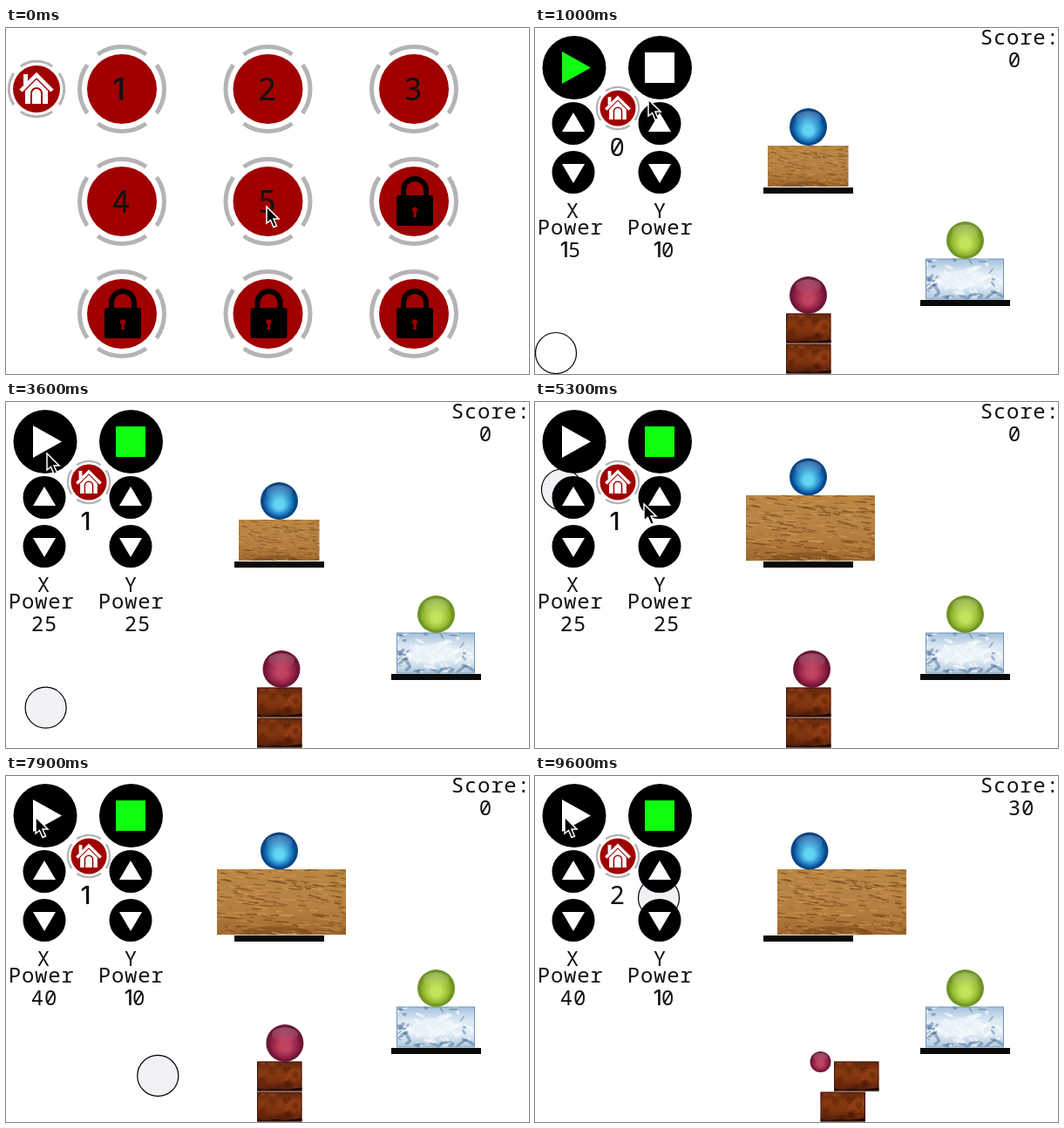
These frames come from a looping animation (600x397 px, 9700 ms). An HTML page with a canvas:

```html
<!DOCTYPE html>
<html lang="en">
<head>
<meta charset="utf-8">
<title>Ball launcher</title>
<style>
  html, body { margin: 0; width: 100%; height: 100%; overflow: hidden; background: #fff; }
  canvas { display: block; }
</style>
</head>
<body>
<canvas id="stage" width="600" height="397"></canvas>
<script>
const c = document.getElementById('stage').getContext('2d');
const LOOP = 9700, STEP = 100, GRAVITY = 4e-4;
const OPEN = 300, LAUNCH = 3550, GROW = 4050, RELAUNCH = 7950, CRASH = 8080, PUSH = 9250;
const RED = '#a00000', GREEN = '#10ff10';

// Keys are [time, value]; gravity bends each stretch into a parabola.
function track(t, keys, gravity = 0) {
  if (t <= keys[0][0]) return keys[0][1];
  for (let i = 1; i < keys.length; i++) {
    const [a, from] = keys[i - 1], [b, to] = keys[i];
    if (t <= b) return from + (to - from) * (t - a) / (b - a) - gravity / 2 * (t - a) * (b - t);
  }
  return keys[keys.length - 1][1];
}
const count = (t, times) => times.filter(time => t >= time).length;

const ballX = [[LAUNCH, 24], [GROW, 240], [5180, 24], [5300, 31], [6800, 114], [RELAUNCH, 177],
  [CRASH, 264], [8600, 24], [8800, 84], [PUSH, 218], [9600, 142]];
const ballY = [[LAUNCH, 373], [GROW, 195], [6110, 373], [7486, 373], [RELAUNCH, 345],
  [CRASH, 337], [8240, 373], [9600, 140]];
const cursorPath = [[0, 299, 205], [OPEN, 299, 205], [1000, 130, 82], [1200, 140, 108], [1900, 140, 108],
  [2200, 44, 108], [2800, 44, 108], [3300, 47, 59], [4200, 47, 59], [5300, 125, 117], [5700, 44, 108],
  [6400, 44, 108], [6800, 131, 157], [7400, 133, 157], [7700, 45, 20], [7900, 34, 47]];

function random(seed) {
  return () => (seed = (seed * 16807) % 2147483647) / 2147483647;
}
function disc(x, y, r, fill) {
  c.fillStyle = fill;
  c.beginPath();
  c.arc(x, y, r, 0, 7);
  c.fill();
}
function oval(x, y, rx, ry, turn, fill) {
  c.fillStyle = fill;
  c.beginPath();
  c.ellipse(x, y, rx, ry, turn, 0, 7);
  c.fill();
}
function rect(x, y, w, h, fill) {
  c.fillStyle = fill;
  c.fillRect(x, y, w, h);
}
function shape(points, fill) {
  c.fillStyle = fill;
  c.beginPath();
  points.forEach(([x, y]) => c.lineTo(x, y));
  c.closePath();
  c.fill();
}
function at(x, y, scale, draw) {
  c.save();
  c.translate(x, y);
  c.scale(scale, scale);
  draw();
  c.restore();
}
// Even letter cells, with a narrow cell for the plain one.
function write(text, x, y, size = 24) {
  c.fillStyle = '#111';
  for (const letter of String(text)) {
    const one = letter === '1';
    c.font = `500 ${size}px ${one ? 'Inter' : '"Noto Sans Mono"'}, monospace`;
    c.fillText(letter, x - size * .05, y);
    x += size * (one ? .38 : .63);
  }
}

function ring(r, width) {
  c.strokeStyle = '#b4b4b6';
  c.lineWidth = width;
  for (let i = 0; i < 4; i++) {
    const mid = i * Math.PI / 2;
    c.beginPath();
    c.arc(0, 0, r, mid - .61, mid + .61);
    c.stroke();
  }
}
function home(x, y, scale) {
  at(x, y, scale, () => {
    disc(0, 0, 33, '#fff');
    ring(31.7, 3);
    disc(0, 0, 27, RED);
    rect(-15, -17, 5, 12, '#fff');
    shape([[0, -12], [13, 1], [13, 17], [-13, 17], [-13, 1]], '#fff');
    c.lineJoin = 'miter';
    for (const [color, width, drop] of [[RED, 1.5, 4], ['#fff', 4.5, 0]]) {
      c.strokeStyle = color;
      c.lineWidth = width;
      c.beginPath();
      c.moveTo(-18, 2 + drop);
      c.lineTo(0, -16 + drop);
      c.lineTo(18, 2 + drop);
      c.stroke();
    }
    c.strokeStyle = RED;
    c.lineWidth = 2;
    c.beginPath();
    c.moveTo(-6, 17);
    c.arc(0, 5, 6, Math.PI, 0);
    c.lineTo(6, 17);
    c.stroke();
  });
}
function padlock() {
  c.strokeStyle = '#000';
  c.lineWidth = 6;
  c.beginPath();
  c.moveTo(-13, -5);
  c.arc(0, -13, 13, Math.PI, 0);
  c.lineTo(13, -5);
  c.stroke();
  c.fillStyle = '#000';
  c.beginPath();
  c.roundRect(-21, -7, 42, 35, 3);
  c.fill();
  disc(0, 9.5, 3, RED);
  shape([[-1, 10], [1, 10], [2, 18], [-2, 18]], RED);
}
function menu() {
  home(35, 70, 1);
  for (let i = 0; i < 9; i++) {
    at(133 + i % 3 * 167.5, 70 + Math.floor(i / 3) * 129, 1, () => {
      ring(48.5, 5);
      disc(0, 0, 40, RED);
      if (i < 5) write(i + 1, i ? -10 : -9, 13, 36);
      else at(1, 0, 1, padlock);
    });
  }
}

function marble(x, y, r, rim, body, glow) {
  const fill = c.createRadialGradient(x, y + r * .25, 0, x, y, r);
  fill.addColorStop(0, glow);
  fill.addColorStop(.25, glow);
  fill.addColorStop(.7, body);
  fill.addColorStop(.88, rim);
  fill.addColorStop(1, rim);
  disc(x, y, r, fill);
  const shine = c.createLinearGradient(0, y - r, 0, y);
  shine.addColorStop(0, 'rgba(255,255,255,.3)');
  shine.addColorStop(1, 'rgba(255,255,255,0)');
  oval(x, y - r * .45, r * .7, r * .4, 0, shine);
}
// A block with a vertical gradient and clipped random marks.
function block(x, y, w, h, scale, colors, marks) {
  at(x, y, scale, () => {
    const fill = c.createLinearGradient(0, 0, 0, h);
    colors.forEach((color, i) => fill.addColorStop(i / (colors.length - 1), color));
    rect(0, 0, w, h, fill);
    c.beginPath();
    c.rect(0, 0, w, h);
    c.clip();
    marks(random(77));
  });
}
function wood(x, y, scale) {
  block(x, y, 92.5, 47, scale, ['#b8843f', '#b88445', '#b47d3e', '#9c662c'], rnd => {
    oval(42, 46, 26, 5, 0, 'rgba(80,42,10,.3)');
    for (let i = 0; i < 300; i++) {
      const gx = rnd() * 97 - 6, gy = rnd() * 47, length = 2 + rnd() * 8;
      c.strokeStyle = rnd() < .5 ? 'rgba(88,48,12,.5)' : 'rgba(222,170,96,.45)';
      c.lineWidth = .4 + rnd() * .6;
      c.beginPath();
      c.moveTo(gx, gy);
      c.lineTo(gx + length, gy + rnd() * 1.6);
      c.stroke();
    }
  });
}
function ice(x, y) {
  block(x, y, 90, 47, 1, ['#a3bfda', '#dce8f2', '#e4eef6', '#a9c4dc'], rnd => {
    for (let i = 0; i < 70; i++) {
      const px = rnd() * 90, py = rnd() * 47;
      const edge = Math.min(px, 90 - px) < 16 || Math.min(py, 47 - py) < 6;
      oval(px, py, 2 + rnd() * 6, .8 + rnd() * 1.6, rnd() * 2 - 1,
        edge && i % 3 ? 'rgba(62,100,145,.45)' : 'rgba(255,255,255,.6)');
    }
    oval(42, 24, 26, 11, -.1, 'rgba(240,247,252,.6)');
    c.strokeStyle = '#6f94b8';
    c.lineWidth = 1;
    c.strokeRect(.5, .5, 89, 46);
  });
}
function crate(x, y) {
  block(x, y, 51.5, 34, 1, ['#64260e', '#86390f', '#7c310e', '#4a1a0a'], rnd => {
    for (let i = 0; i < 35; i++) {
      disc(rnd() * 52, rnd() * 31, 1 + rnd() * 4, i % 2 ? 'rgba(176,80,34,.22)' : 'rgba(58,14,4,.22)');
    }
    shape([[0, 31], [8, 33], [20, 31.5], [32, 32.5], [44, 31], [52, 30], [52, 34], [0, 34]], '#160805');
    c.strokeStyle = '#3a1208';
    c.lineWidth = 1;
    c.strokeRect(.5, .5, 50.5, 33);
  });
}

function controls(t) {
  const running = t >= LAUNCH;
  disc(45, 45.5, 36.5, '#000');
  disc(143.5, 45.5, 36.5, '#000');
  shape([[31, 27], [64, 45.5], [31, 64]], running ? '#fff' : GREEN);
  rect(126, 28, 34, 35, running ? GREEN : '#fff');
  for (const x of [44, 143]) {
    disc(x, 109.5, 24.5, '#000');
    disc(x, 165.5, 24.5, '#000');
    shape([[x, 97], [x + 13, 119], [x - 13, 119]], '#fff');
    shape([[x, 178], [x + 13, 156], [x - 13, 156]], '#fff');
  }
  home(95, 92, .76);
  write(count(t, [LAUNCH, RELAUNCH]), 87, 147, 29);

  const powerX = 15 + 5 * count(t, [2400, 2700, 5800, 6100, 6400]);
  const powerY = 10 + 5 * count(t, [1300, 1600, 1900]) - 5 * count(t, [7000, 7200, 7400]);
  write('X', 37, 218);
  write('Y', 137, 218);
  write('Power', 4, 237);
  write('Power', 107, 237);
  write(powerX, 30, 263);
  write(powerY, 137, 263);
  write('Score:', 512, 19);
  write(t >= CRASH ? 30 : 0, 544, 45);
}
function game(t) {
  const grown = t >= GROW, crashed = t >= CRASH;
  rect(262, 183, 103, 7, '#0a0a0a');
  rect(442, 312, 103, 7, '#0a0a0a');
  wood(grown ? track(t, [[PUSH, 242], [9600, 278]]) : 267, grown ? 107 : 135, grown ? 1.6 : 1);
  marble(track(t, [[PUSH, 313.5], [9600, 315]]), grown ? 86 : 113.5, 21.5, '#0a4585', '#1774bc', '#62d4f4');
  ice(448, 264.5);
  marble(493.5, 243.5, 21.5, '#6f9422', '#93b832', '#c2e45c');
  crate(track(t, [[CRASH, 288], [8800, 325], [9600, 343]]), 327.5);
  crate(track(t, [[CRASH, 288], [8800, 308.5], [9600, 327.5]]), 362.5);
  const redX = track(t, [[1000, 313.5], [6800, 319], [CRASH, 320], [8800, 331], [9600, 327.5]]);
  const redY = crashed ? track(t, [[CRASH, 315], [8800, 313.5], [9200, 315], [9600, 328]]) : 306.5;
  marble(redX, redY, crashed ? 12 : 21.5, '#6c1636', '#922046', '#c04460');

  const x = track(t, ballX), y = track(t, ballY, GRAVITY);
  disc(x, y, 23.5, t < LAUNCH ? '#fff' : '#f3f1f5');
  c.strokeStyle = '#000';
  c.lineWidth = 1.2;
  c.stroke();
  controls(t);
}
function cursor(t) {
  const [x, y] = [1, 2].map(axis => track(t, cursorPath.map(key => [key[0], key[axis]])));
  at(x, y, 1, () => {
    shape([[0, 0], [0, 19], [4.5, 15.5], [8, 23.5], [11.5, 22], [8, 14], [14, 14]], '#000');
    c.strokeStyle = '#fff';
    c.lineWidth = 1.5;
    c.stroke();
  });
}

function frame(now) {
  const t = Math.floor(now % LOOP / STEP) * STEP;
  rect(0, 0, 600, 397, '#fff');
  if (t < OPEN) menu();
  else game(t);
  cursor(t);
  requestAnimationFrame(frame);
}
requestAnimationFrame(frame);
</script>
</body>
</html>
```
